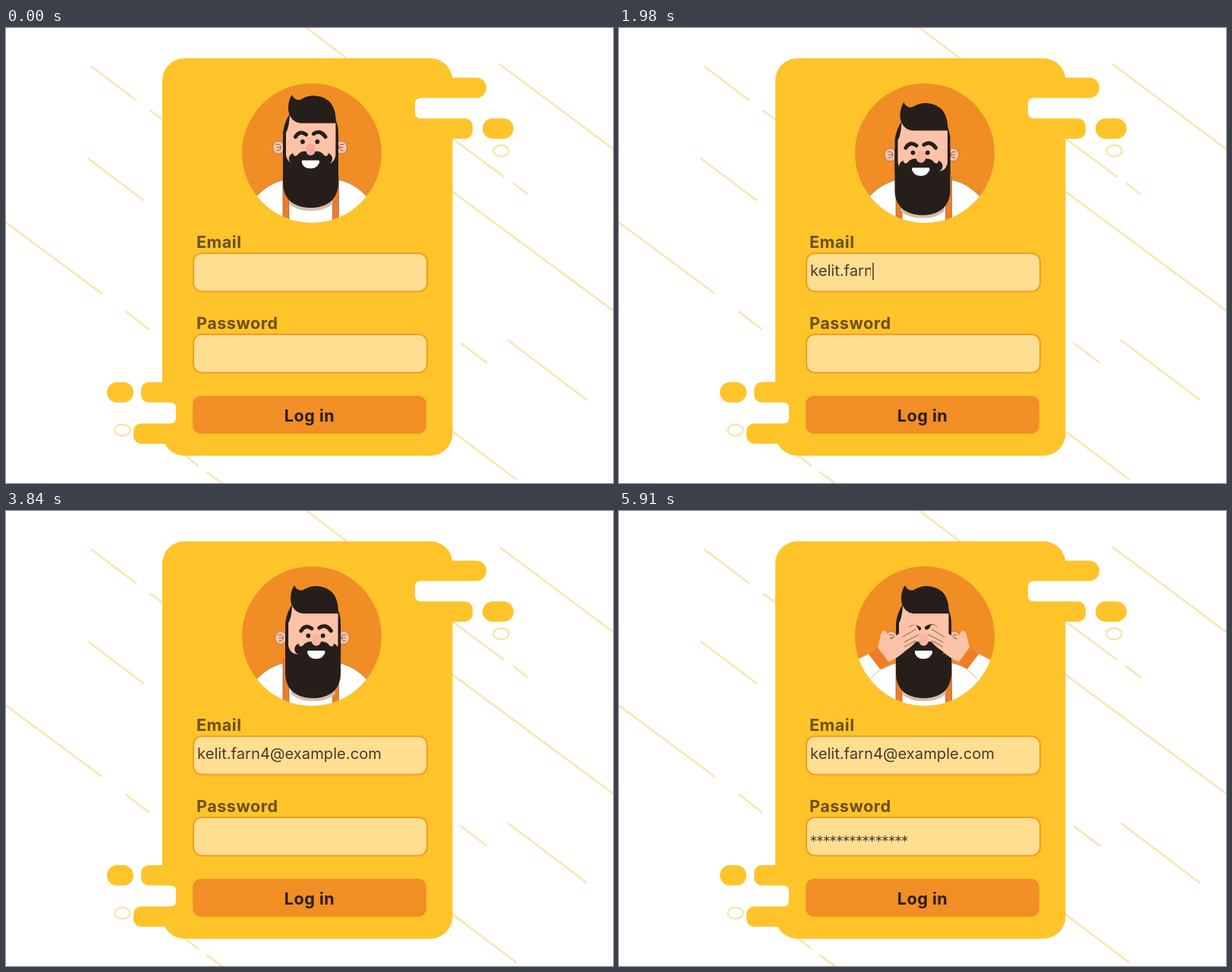
An HTML page for the animation above (6300 ms loop, 800 px wide and 600 px high).

```html
<!DOCTYPE html>
<html lang="en">
<head>
<meta charset="utf-8">
<title>Login card</title>
<style>
  html, body { margin: 0; width: 100%; height: 100%; overflow: hidden; background: #fff; }
  svg { display: block; width: 800px; height: 600px; }
  text { font-family: Inter, sans-serif; }
  .label { font-size: 21.6px; font-weight: 700; letter-spacing: .5px; fill: #6c4f1c; }
  .field { fill: #fedf92; stroke: #f69a24; stroke-width: 2; }
  .faint { fill: none; stroke: #f9e4b4; stroke-width: 2.5; stroke-linecap: round; }
  .fine { fill: none; stroke: #8a6249; stroke-width: 1; stroke-linecap: round; }
  .caret { stroke: #5a412c; stroke-width: 1.6; }
  .yellow { fill: #fec42a; }
  .orange { fill: #ee7d26; }
  .skin { fill: #fdc2a7; }
  .dark { fill: #251e1a; }
</style>
</head>
<body>
<svg viewBox="0 0 800 600">
  <defs>
    <clipPath id="disc"><circle cx="403" cy="165" r="92"/></clipPath>
    <clipPath id="emailClip"><rect x="250" y="300" width="0" height="44"/></clipPath>
    <clipPath id="passClip"><rect x="250" y="407" width="0" height="44"/></clipPath>
    <g id="ear">
      <ellipse class="skin" cx="359" cy="157.500" rx="7.500" ry="8.500" stroke="#8a6249" stroke-width=".7"/>
      <path class="fine" d="M356 153.500q6-1 6.500 4q-1 4.500-5.500 4M357 157.500h5"/>
    </g>
    <path id="moustache" class="dark" d="M402 165C396 161 388 162 384.500 167C382 170 378 169 378.500 165C371 167 371 178 379 179.500L390 182V175H402Z"/>
    <g id="arm">
      <path d="M304 201L330 188L346 209L328 224L304 224Z" fill="#fff"/>
      <path class="fine" d="M345 208L331 221" opacity=".45"/>
      <path class="orange" d="M329 189L341 179L356 200L344 208.500Z"/>
      <path class="skin" d="M341 180L345 163Q347 156 352 159L358 169Q372 159 386 151Q392 148 393 153L396 158Q398 163 396 166Q390 176 378 184Q366 195 355 199Z"/>
      <path class="fine" d="M374 166L391 156M376 173L395 163M376 179L391 171M358 169L363 166"/>
    </g>
  </defs>

  <path class="faint" d="M113 51l58 44M190 109l18 13M394-2l55 42M651 48l151 113M108 172l73 55M-2 255l128 95M158 374l30 23M586 144l70 52M669 205l18 14M586 214l216 160M600 416l33 25M662 412l103 78M586 530l86 65M234 562l19 15M265 586l21 15"/>

  <g class="yellow">
    <rect x="206" y="40" width="382.500" height="524" rx="29"/>
    <rect x="545" y="65.500" width="88" height="26.800" rx="13"/>
    <rect x="545" y="119.300" width="70" height="26.700" rx="10"/>
    <rect x="628" y="119.300" width="41" height="26.700" rx="13.300"/>
    <rect x="178" y="467" width="60" height="26.800" rx="10"/>
    <rect x="168" y="521.500" width="60" height="26.800" rx="10"/>
    <rect x="133" y="467" width="35" height="26.800" rx="13.300"/>
  </g>
  <path fill="#fff" d="M589 92.300H547Q539 92.300 539 100V111Q539 119.300 547 119.300H589ZM205.500 493.800H216Q224 493.800 224 501V514Q224 521.500 216 521.500H205.500Z"/>
  <ellipse class="faint" cx="652.500" cy="162" rx="10" ry="7.500"/>
  <ellipse class="faint" cx="153.500" cy="530.300" rx="10" ry="7.500"/>

  <circle cx="403" cy="165" r="92" fill="#f08d25"/>
  <g clip-path="url(#disc)">
    <path d="M314 244Q336 206 368 200H437Q468 205 492 244V262H314Z" fill="#fff" stroke="#9c7a55" stroke-width=".7"/>
    <path class="orange" d="M365 195h8v65h-8zM430.500 195h8v65h-8z"/>
    <path class="fine" d="M365 195v65M373 195v65M430.500 195v65M438.500 195v65" opacity=".7"/>
    <g id="head">
      <path d="M373 205H430.500V232Q420 241 402 241Q383 241 373 232Z" fill="#cfc0a8"/>
      <use href="#ear"/>
      <use href="#ear" transform="translate(801 0) scale(-1 1)"/>
      <path class="dark" d="M365 182V138Q367 123 375 112L434 120Q438 128 438 138V182Z"/>
      <path class="skin" d="M369 190V138Q373 132 374 115H434.500V190Z"/>
      <path class="dark" d="M377 88C379 94 385 97 391 93C402 86 420 89 428 99C434 107 435 117 435 125.500H389C377 125 372 114 372 106C372 99 374 92 377 88Z"/>
      <path class="dark" d="M365 150H368.500V166Q371 179 381 179H423Q433 179 434.800 166V150H438V204C438 227 422 237 402 237C381 237 365 227 365 204Z"/>
    </g>
    <g id="mouth">
      <use href="#moustache"/>
      <use href="#moustache" transform="translate(803 0) scale(-1 1)"/>
      <path d="M390 174.500H412.500V177Q411 185.300 401.300 185.300Q391.500 185.300 390 177Z" fill="#fff"/>
      <rect class="skin" x="395.500" y="152" width="12" height="16" rx="6"/>
      <rect id="nose" x="395.500" y="152" width="12" height="15" rx="6" fill="#faa69b"/>
    </g>
    <g id="eyes">
      <circle class="dark" cx="391" cy="150" r="2.900"/>
      <circle class="dark" cx="410.300" cy="150" r="2.900"/>
      <path d="M381.500 143.500Q387 134.500 395.500 140.500M405.500 139.500Q414 133.500 421 143.500" fill="none" stroke="#251e1a" stroke-width="5" stroke-linecap="round"/>
    </g>
    <use id="armL" href="#arm"/>
    <use id="armR" href="#arm"/>
  </g>

  <text class="label" x="251" y="289.500">Email</text>
  <rect class="field" x="247" y="297" width="308" height="50.500" rx="11"/>
  <text x="252" y="327" font-size="20.200" fill="#4d382b" clip-path="url(#emailClip)">kelit.farn4@example.com</text>
  <line id="emailCaret" class="caret" y1="309.500" y2="332.500"/>

  <text class="label" x="251" y="396.500">Password</text>
  <rect class="field" x="247" y="404" width="308" height="50.500" rx="11"/>
  <text x="252" y="441" style="font-family:'DejaVu Sans',sans-serif" font-size="17.200" fill="#33271f" clip-path="url(#passClip)">***************</text>
  <line id="passCaret" class="caret" y1="417" y2="440"/>

  <rect x="246" y="485" width="308" height="50" rx="11" fill="#f18e26"/>
  <text class="label" x="400" y="519" text-anchor="middle" style="fill:#251e1a">Log in</text>
</svg>
<script>
const LOOP = 6300, TYPE_SPEED = 0.0925, LEFT = 252;
const $ = id => document.getElementById(id);
const smooth = (t, a, b) => {
  const k = Math.min(1, Math.max(0, (t - a) / (b - a)));
  return k * k * (3 - 2 * k);
};
const move = (id, x, y) => $(id).setAttribute('transform', `translate(${x} ${y})`);

// Horizontal gaze: [time, offset] pairs, linear between them
const GAZE = [[0, 0], [700, 0], [1200, -9.3], [3700, 9], [4500, 0], [LOOP, 0]];
function gazeAt(t) {
  const i = GAZE.findIndex(([time]) => time > t);
  const [t0, x0] = GAZE[i - 1], [t1, x1] = GAZE[i];
  return x0 + (x1 - x0) * (t - t0) / (t1 - t0);
}

function type(name, t, start, width) {
  const typed = (t - start) * TYPE_SPEED;
  const active = typed >= 0 && typed < width;
  const shown = typed < 0 ? 0 : active ? Math.max(0, typed - 1) : 300;
  $(name + 'Clip').firstElementChild.setAttribute('width', shown);
  const caret = $(name + 'Caret');
  caret.setAttribute('visibility', active ? 'visible' : 'hidden');
  caret.setAttribute('x1', LEFT + typed);
  caret.setAttribute('x2', LEFT + typed);
}

function draw(now) {
  const t = now % LOOP;
  const gaze = gazeAt(t), nod = smooth(t, 300, 900), raise = smooth(t, 4450, 4950);
  move('head', gaze * 0.42, nod * 9.7);
  move('mouth', gaze, nod * 9.7);
  move('eyes', gaze, nod * 14.5);
  $('nose').setAttribute('opacity', 1 - nod * 0.45);

  const dx = -35 * (1 - raise), dy = 110 * (1 - raise);
  move('armL', dx, dy);
  $('armR').setAttribute('transform', `translate(${803 - dx} ${dy}) scale(-1 1)`);

  type('email', t, 1085, 245);
  type('pass', t, 4500, 130);
  requestAnimationFrame(() => draw(performance.now() - begin));
}
const begin = performance.now();
draw(0);
</script>
</body>
</html>
```
